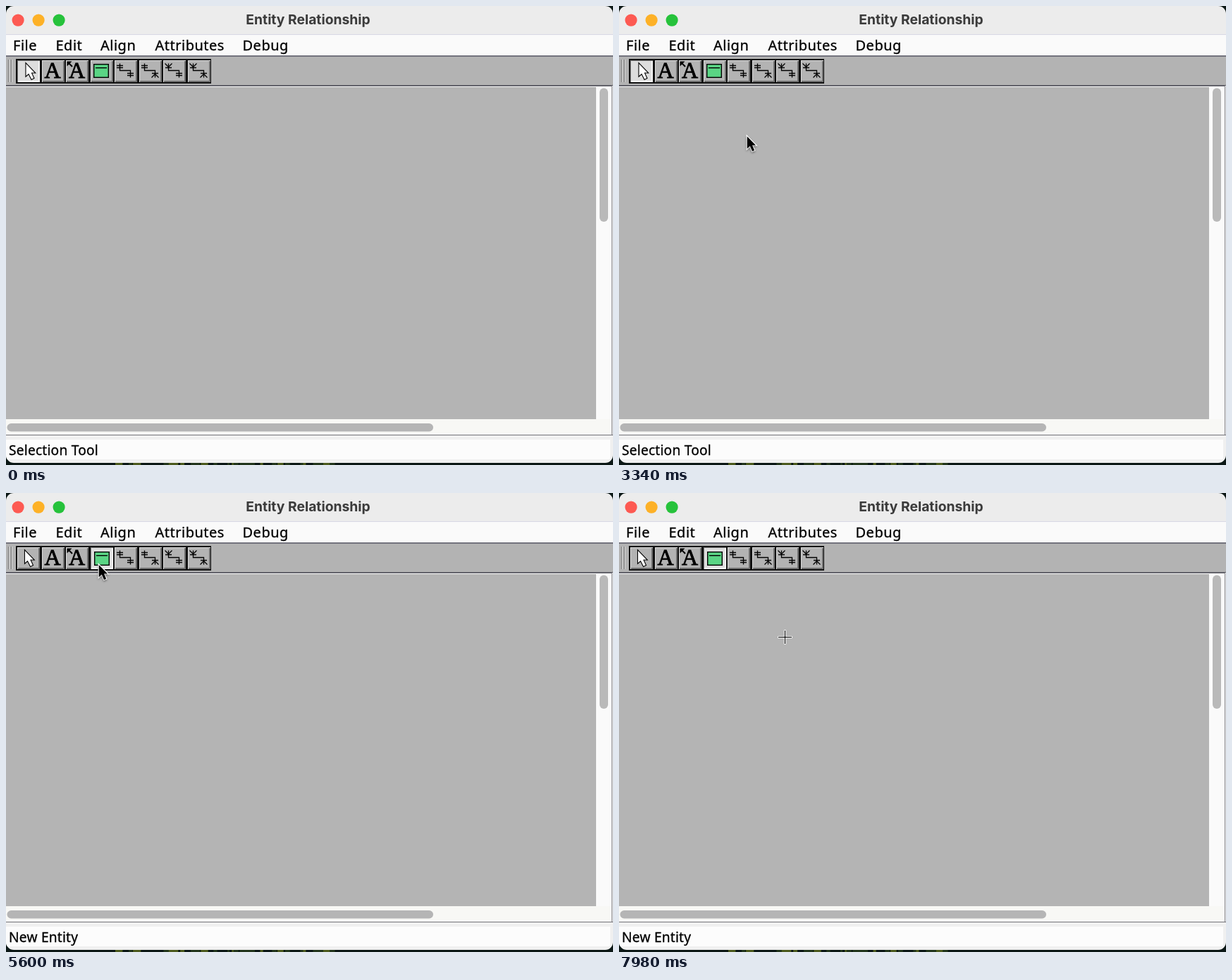
An HTML page with a canvas for the animation above (8000 ms loop, 861x651 px).

```html
<!DOCTYPE html>
<html lang="en">
<head>
<meta charset="utf-8">
<title>Diagram editor</title>
<style>
html, body { margin: 0; width: 100%; height: 100%; overflow: hidden; background: #0b1715; }
canvas { display: block; }
</style>
</head>
<body>
<canvas id="stage" width="861" height="651"></canvas>
<script>
const W = 861, H = 651, LOOP = 8000, PRESS = 5500;
const ctx = document.getElementById('stage').getContext('2d');
const UI = '"Noto Sans", "Open Sans", sans-serif';

// Pointer path: time, x, y
const path = [
  [960, 402, 664], [1100, 388, 624], [2360, 213, 306], [2500, 205, 280],
  [3340, 181, 183], [3700, 178, 176], [4780, 133, 106], [5200, 131, 100],
  [6600, 131, 100], [7750, 235, 204], [8000, 235, 204]
];

function rect(x, y, w, h, color) {
  ctx.fillStyle = color;
  ctx.fillRect(x, y, w, h);
}

function pill(x, y, w, h, color) {
  ctx.fillStyle = color;
  ctx.beginPath();
  ctx.roundRect(x, y, w, h, Math.min(w, h) / 2);
  ctx.fill();
}

function line(points, width = 1.3) {
  ctx.strokeStyle = '#000';
  ctx.lineWidth = width;
  ctx.beginPath();
  points.forEach(([x, y]) => ctx.lineTo(x, y));
  ctx.stroke();
}

function polygon(points, fill, stroke, width) {
  ctx.beginPath();
  points.forEach(([x, y]) => ctx.lineTo(x, y));
  ctx.closePath();
  if (stroke) {
    ctx.strokeStyle = stroke;
    ctx.lineWidth = width;
    ctx.stroke();
  }
  ctx.fillStyle = fill;
  ctx.fill();
}

// Text thickened by a thin outline
function text(str, x, y, font, { color = '#000', align = 'left', spacing = 0, weight = 0.3 } = {}) {
  ctx.font = font;
  ctx.fillStyle = ctx.strokeStyle = color;
  ctx.textAlign = align;
  ctx.letterSpacing = spacing + 'px';
  ctx.lineWidth = weight;
  ctx.fillText(str, x, y);
  ctx.strokeText(str, x, y);
}

function drawDesktop() {
  rect(0, 0, W, H, '#0b1715');
  let seed = 7;
  const rand = () => (seed = seed * 16807 % 2147483647) / 2147483647;
  for (let i = 0; i < 40; i++) {
    const x = 155 + rand() * 325;
    rect(x, 648, 3 + rand() * 8, 3, rand() < 0.5 ? '#4c5a1e' : '#22351c');
  }
}

function drawWindow() {
  rect(0, 0, W, 41, '#ececec');
  rect(0, 40, W, 1, '#d7d7e4');
  rect(0, 41, W, 30, '#fafafa');
  rect(0, 70, W, 2, '#73737d');
  rect(0, 72, W, 40, '#b3b3b3');
  rect(0, 112, W, 2, '#62626a');
  rect(0, 114, W, 1, '#ffffff');
  rect(0, 115, 837, 471, '#b4b4b4');

  rect(837, 114, 22, 494, '#fafafa');
  rect(0, 586, 859, 22, '#f8f8f5');
  rect(859, 113, 1, 496, '#85858b');
  rect(860, 113, 1, 496, '#eeeeee');
  pill(842, 116.5, 12, 189.5, '#b9b9b9');
  pill(1.5, 592, 604.5, 11.5, '#b5b5b5');

  rect(0, 608, W, 1, '#73737a');
  rect(0, 609, W, 39, '#f0f0f0');
  rect(0, 615, 857, 28, '#fcfcfc');

  ['#fd5a52', '#fdb127', '#26c23b'].forEach((color, i) =>
    pill(8.5 + i * 29, 11.5, 17.2, 17.2, color));
  text('Entity Relationship', 428.5, 26, 'bold 19.3px Inter, sans-serif',
    { color: '#3b3b3b', align: 'center', weight: 0.01 });

  const menus = { File: 10, Edit: 70.5, Align: 134, Attributes: 211.5, Debug: 335.5 };
  for (const name in menus) text(name, menus[name], 63, `20px ${UI}`, { spacing: 0.5 });
}

function drawArrowIcon(x) {
  const shape = [[0, 0], [0, 17], [3.7, 13.8], [7.8, 21.8], [10.8, 20.2], [7.2, 12.5], [12, 12.5]];
  polygon(shape.map(([a, b]) => [x + a, 82 + b]), '#fff', '#000', 2.2);
}

function drawLetterIcon(x) {
  text('A', x, 102, '32px "Liberation Serif", serif', { align: 'center', weight: 0.9 });
}

function drawEntityIcon(x, y) {
  rect(x, y, 22, 20, '#000');
  rect(x + 1.4, y + 1.4, 19.2, 17.2, '#5ad584');
  rect(x + 3, y + 5, 16, 1.4, '#000');
}

// Marks on a vertical link end; dir points away from the bend
function drawEnd(x, y, dir, many) {
  const bar = d => line([[x - 4.5, y + d * dir], [x + 4.5, y + d * dir]]);
  bar(4);
  if (many) line([[x - 5, y + 10 * dir], [x, y + 5 * dir], [x + 5, y + 10 * dir]]);
  else bar(7);
}

function drawLinkIcon(x, manyStart, manyEnd) {
  const a = x + 9.5, b = x + 24.5, y = 91.5;
  line([[a, y - 10], [a, y], [b, y], [b, y + 10]]);
  drawEnd(a, y, -1, manyStart);
  drawEnd(b, y, 1, manyEnd);
}

function drawButton(x, pressed) {
  rect(x - 1, 75, 35, 35, '#111');
  rect(x + 1, 77, 32, 31, pressed ? '#777' : '#dedede');
  rect(x + 2, 78, 31, 30, pressed ? '#f4f4f4' : '#6e6e6e');
  rect(x + 2, 78, 29, 28, pressed ? '#dddddd' : '#b3b3b3');
}

function drawToolbar(active) {
  for (const x of [3, 7]) {
    rect(x, 76, 1, 32, '#777');
    rect(x + 1, 76, 1, 32, '#d8d8d8');
  }
  for (let i = 0; i < 8; i++) {
    const x = 15 + Math.round(i * 34.5), on = i === active;
    drawButton(x, on);
    if (i === 0) drawArrowIcon(on ? 28.5 : 27);
    if (i === 1) drawLetterIcon(66);
    if (i === 2) {
      drawLetterIcon(100.5);
      polygon([[86.5, 78.5], [93.5, 78.5], [86.5, 85.5]], '#000');
      line([[88, 80], [94, 86]], 2);
    }
    if (i === 3) drawEntityIcon(on ? 125 : 124, on ? 83 : 82);
    if (i > 3) drawLinkIcon(x - 1, i > 5, i % 2 === 1);
  }
}

function pointerAt(t) {
  const i = path.findIndex(key => key[0] > t);
  if (i < 1) return null;
  const a = path[i - 1], b = path[i];
  const u = (t - a[0]) / (b[0] - a[0]);
  const e = b[0] - a[0] > 1000 ? u * u * (3 - 2 * u) : u;
  return [a[1] + (b[1] - a[1]) * e, a[2] + (b[2] - a[2]) * e];
}

function drawPointer(x, y) {
  const shape = [[0, 0], [0, 17.3], [4, 13.6], [7.3, 21], [10.3, 19.7], [7.2, 12.4], [12.2, 12.4]];
  ctx.save();
  ctx.translate(x + 0.8, y + 2);
  ctx.shadowColor = 'rgba(0,0,0,.3)';
  ctx.shadowBlur = 3;
  ctx.shadowOffsetY = 1.5;
  polygon(shape, '#fff', '#fff', 2.4);
  ctx.shadowColor = 'transparent';
  polygon(shape, '#000');
  ctx.restore();
}

function drawCross(x, y) {
  x = Math.round(x);
  y = Math.round(y);
  rect(x - 10, y - 1, 21, 3, '#eeeeee');
  rect(x - 1, y - 10, 3, 21, '#eeeeee');
  rect(x - 9, y, 19, 1, '#000');
  rect(x, y - 9, 1, 19, '#000');
}

function draw(t) {
  const entity = t >= PRESS;
  drawDesktop();
  ctx.save();
  ctx.beginPath();
  ctx.roundRect(0, 0, W, 648, 11);
  ctx.clip();
  drawWindow();
  drawToolbar(entity ? 3 : 0);
  text(entity ? 'New Entity' : 'Selection Tool', 4, 637, `19.2px ${UI}`, { spacing: 0.2 });
  ctx.restore();

  const pos = pointerAt(t);
  if (!pos) return;
  if (entity && pos[1] > 114) drawCross(...pos);
  else drawPointer(...pos);
}

const start = performance.now();
function tick() {
  draw((performance.now() - start) % LOOP);
  requestAnimationFrame(tick);
}
tick();
</script>
</body>
</html>
```
